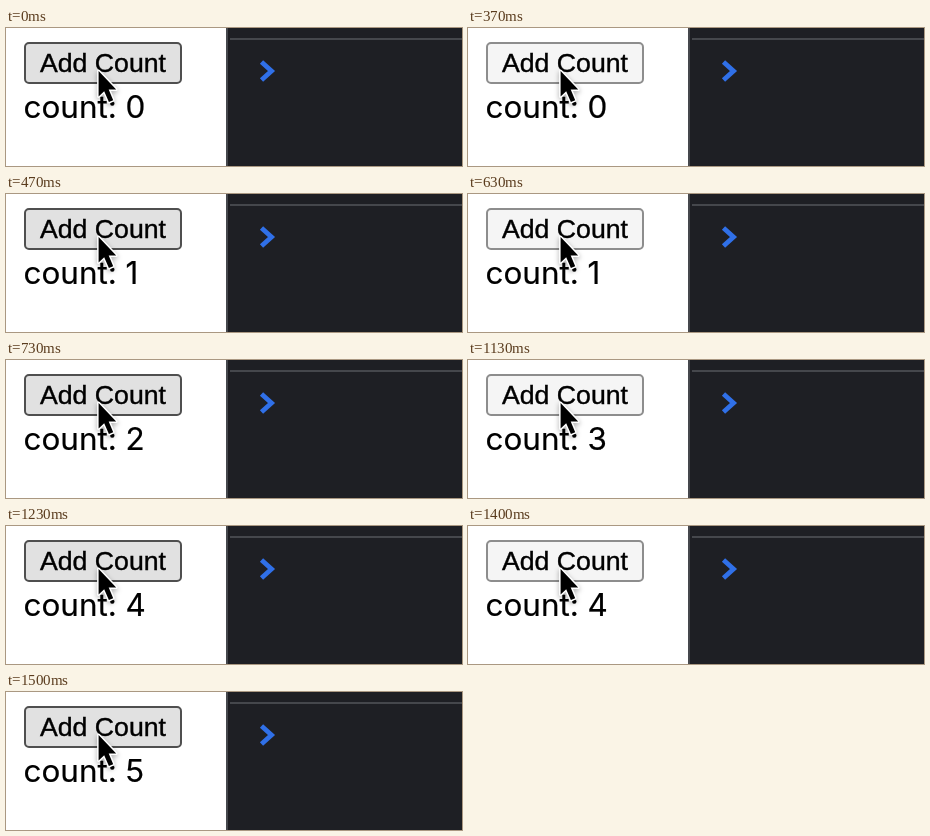
These frames come from a looping animation (456 by 138 pixels, 1.66 s). An HTML page with a canvas:

```html
<!DOCTYPE html>
<html lang="en">
<head>
<meta charset="utf-8">
<title>Add Count</title>
<style>
  html, body { margin: 0; width: 100%; height: 100%; overflow: hidden; background: #fff; }
  canvas { display: block; }
</style>
</head>
<body>
<canvas id="stage" width="456" height="138"></canvas>
<script>
const ctx = document.getElementById('stage').getContext('2d');
const LOOP = 1660;
// Press and release time of each click; the count rises on release.
const CLICKS = [[370, 470], [630, 730], [870, 930], [1130, 1230], [1400, 1500]];

function rect(x, y, w, h, color) {
  ctx.fillStyle = color;
  ctx.fillRect(x, y, w, h);
}

// A thin outline gives the text its slightly heavier weight.
function text(str, x, y, font, weight) {
  ctx.font = font;
  ctx.fillStyle = ctx.strokeStyle = '#000';
  ctx.lineWidth = weight;
  ctx.fillText(str, x, y);
  ctx.strokeText(str, x, y);
}

function trace(points) {
  ctx.beginPath();
  points.forEach(([x, y]) => ctx.lineTo(x, y));
}

function drawButton(pressed) {
  ctx.beginPath();
  ctx.roundRect(19, 15, 156, 40, 4);
  ctx.fillStyle = pressed ? '#f5f5f5' : '#e1e1e1';
  ctx.fill();
  ctx.lineWidth = 2;
  ctx.strokeStyle = pressed ? '#8d8d8d' : '#4f4f4f';
  ctx.stroke();
  text('Add Count', 34, 43.6, '26.67px "Liberation Sans", Arial, sans-serif', 0.4);
}

function drawConsole() {
  rect(220, 0, 236, 138, '#1e1f24');
  rect(220, 0, 2, 138, '#45474c');
  rect(224, 10, 232, 2, '#45474c');
  trace([[255.5, 34], [265.5, 43], [255.5, 52]]);
  ctx.lineWidth = 4.8;
  ctx.lineJoin = 'miter';
  ctx.strokeStyle = '#3070e8';
  ctx.stroke();
}

function drawCursor() {
  trace([[92.6, 43], [92.6, 68.4], [98.2, 63.2], [102.9, 74], [107.2, 72.2], [102.7, 61.5], [110.2, 61.5]]);
  ctx.closePath();
  ctx.lineWidth = 3;
  ctx.lineJoin = 'round';
  ctx.strokeStyle = '#fff';
  ctx.save();
  ctx.shadowColor = 'rgba(0, 0, 0, 0.35)';
  ctx.shadowBlur = 5;
  ctx.shadowOffsetY = 2;
  ctx.stroke();
  ctx.restore();
  ctx.fillStyle = '#000';
  ctx.fill();
}

function draw(now) {
  const t = now % LOOP;
  const pressed = CLICKS.some(([down, up]) => t >= down && t < up);
  const count = CLICKS.filter(([, up]) => t >= up).length;
  rect(0, 0, 456, 138, '#fff');
  drawConsole();
  drawButton(pressed);
  text('count: ' + count, 17.6, 90.3, '31.4px Inter, sans-serif', 0.2);
  drawCursor();
}

const start = performance.now();
function tick() {
  draw(performance.now() - start);
  requestAnimationFrame(tick);
}
tick();
</script>
</body>
</html>
```
